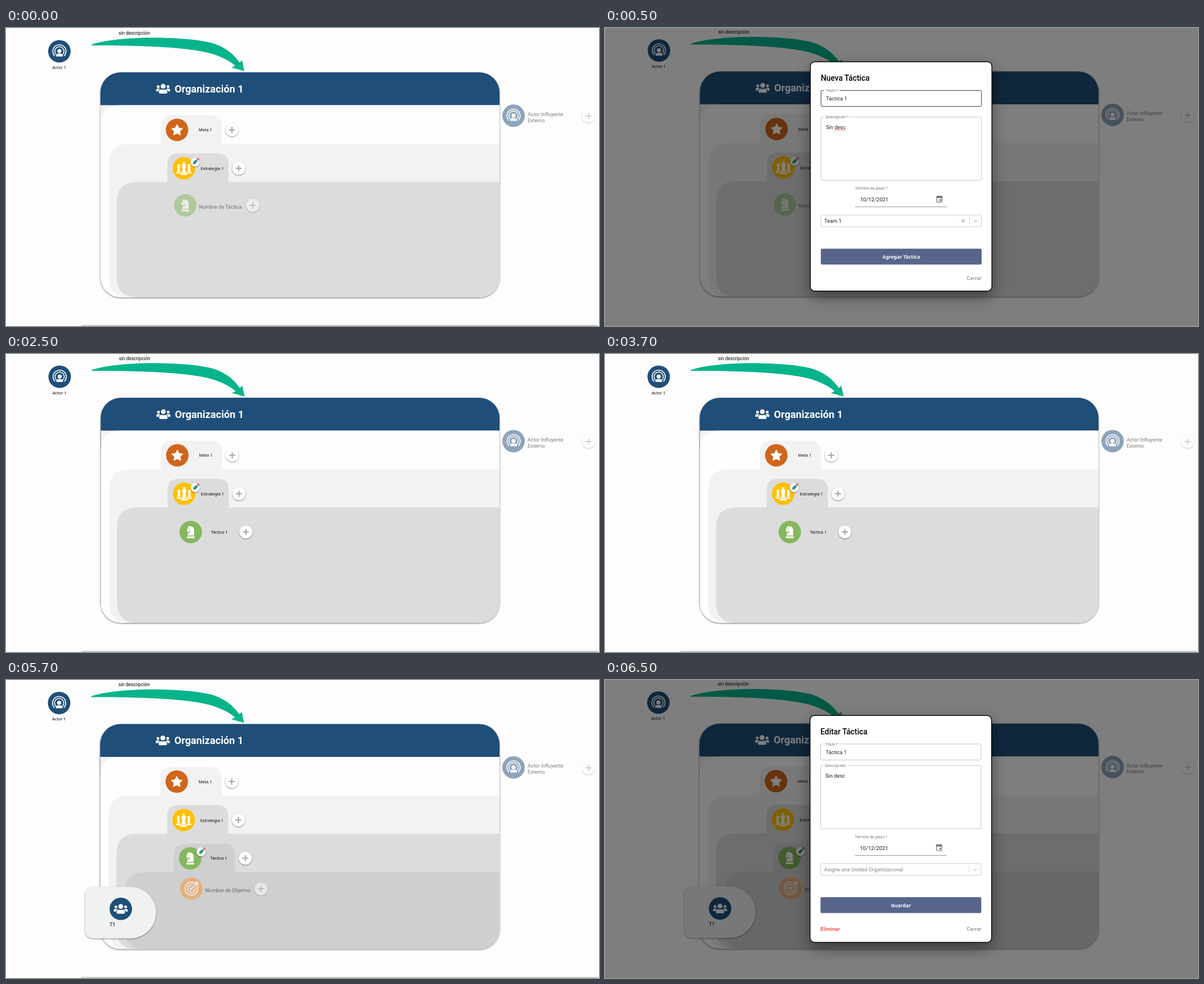
Write an HTML page that moves like this. It is 1055x531 px and loops after 8 s.

```html
<!DOCTYPE html>
<html lang="es">
<head>
<meta charset="utf-8">
<title>Organización</title>
<style>
html, body { margin: 0; width: 100%; height: 100%; overflow: hidden; background: #fdfdfd; }
svg { display: block; width: 1055px; height: 531px; }
text { font: 9.1px Roboto, sans-serif; fill: #000; }
.label { font: 500 7.4px "Noto Sans", sans-serif; }
.field { letter-spacing: .085px; fill: #1c1c1c; }
.small { font-size: 6.8px; letter-spacing: .06px; fill: #757575; }
.title { font: 500 13.8px Roboto, sans-serif; }
.main { font: 700 8.6px "Noto Sans", sans-serif; fill: #fff; text-anchor: middle; }
.link { font-weight: 500; letter-spacing: .2px; }
.soft { filter: drop-shadow(0 1px 1.3px rgba(0,0,0,.45)); }
.deep { filter: drop-shadow(0 10px 13px rgba(0,0,0,.42)); }
</style>
</head>
<body>
<svg id="stage" viewBox="0 0 1055 531"></svg>
<script>
const BLUE = '#1f4e79', ORANGE = '#d0661a', YELLOW = '#ffc000', GREEN = '#84b85e', AMBER = '#ff9131';
const RIGHT = 878;

const at = (x, y, body, attrs = '') => `<g transform="translate(${x} ${y})" ${attrs}>${body}</g>`;
const text = (x, y, s, cls = '', attrs = '') => `<text x="${x}" y="${y}" class="${cls}" ${attrs}>${s}</text>`;
const line = (d, color, w, attrs = '') => `<path d="${d}" fill="none" stroke="${color}" stroke-width="${w}" ${attrs}/>`;
const fill = (d, color) => `<path d="${d}" fill="${color}"/>`;
const dot = (x, y, r, color = '#fff') => `<circle cx="${x}" cy="${y}" r="${r}" fill="${color}"/>`;
const box = (x, y, w, h, r, attrs) => `<rect x="${x}" y="${y}" width="${w}" height="${h}" rx="${r}" ${attrs}/>`;
const badge = (x, y, color, icon) => at(x, y, dot(0, 0, 20, color) + icon);

const arc = (r, deg) => {
  const a = deg * Math.PI / 180, x = r * Math.cos(a), y = r * Math.sin(a);
  return line(`M${-x} ${y}A${r} ${r} 0 1 1 ${x} ${y}`, '#fff', 1.6, 'stroke-linecap="round"');
};

const star = () => {
  const pts = Array.from({ length: 10 }, (_, i) => {
    const r = i % 2 ? 5 : 10, a = i * Math.PI / 5;
    return `${r * Math.sin(a)},${.8 - r * Math.cos(a)}`;
  });
  return `<polygon points="${pts.join(' ')}" fill="#fff" stroke="#fff" stroke-width="1.4" stroke-linejoin="round"/>`;
};

const actorIcon = arc(11.8, 42) + arc(8.2, 38) + dot(0, -.4, 3.7) +
  fill('M-6 9.2V8Q-6 4.3 -2.4 4.3H2.4Q6 4.3 6 8V9.2Z', '#fff');

const side = dot(-8.7, -3.6, 2.5) + fill('M-12.4 4.2V1.8Q-12.4 .1 -10 .1H-7.2Q-6.2 .1 -5.5 .8Q-7.9 2.2 -8.5 4.9H-11.6Q-12.4 4.9 -12.4 4.2Z', '#fff');
const teamIcon = side + `<g transform="scale(-1 1)">${side}</g>` + dot(0, -4.3, 4.3) +
  fill('M-7.4 7V5.8Q-7.4 1.4 -3 1.4Q0 2.6 3 1.4Q7.4 1.4 7.4 5.8V7Q7.4 8.7 5.7 8.7H-5.7Q-7.4 8.7 -7.4 7Z', '#fff');

const pawn = x => at(x, 0, dot(0, -5.2, 2.3) +
  fill('M-2.6 -3H2.6V-1.6H1.6Q1.7 3 3 5.6H-3Q-1.7 3 -1.6 -1.6H-2.6ZM-4 6.4H4V9H-4Z', '#fff'));
const chessIcon = pawn(-9.3) + pawn(9.3) +
  fill('M-.9 -12H.9V-10.5H2.3V-8.8H.9V-7.3H4.6L2.8 -2.6H3.6V-.8H2.5Q2.7 5 4.2 8H-4.2Q-2.7 5 -2.5 -.8H-3.6V-2.6H-2.8L-4.6 -7.3H-.9V-8.8H-2.3V-10.5H-.9ZM-5.7 8.8H5.7V12H-5.7Z', '#fff');

const knightIcon = fill('M-4.6 -10.2H0Q6 -9.6 6 -2.5V6.2H-5.6V4.8Q-5.2 2.6 -2.7 1.2Q-.4 0 -.4 -2.3L-2.7 -1.4L-3.8 .5L-6.5 -.8V-5.5L-5 -7.4ZM-6.8 7.8H7V11H-6.8Z', '#fff') +
  dot(-2.6, -5.4, .9, GREEN);

const goalIcon = [11.4, 6.8].map(r => `<circle r="${r}" fill="none" stroke="#fff" stroke-width="2.1"/>`).join('') + dot(0, 0, 3) +
  line('M0 0L10 -10', AMBER, 4.5) + line('M0 0L9 -9', '#fff', 1.7) + fill('M6 -10L10.5 -14L11 -11L14 -10.5L10 -6H6Z', '#fff');

const plus = (x, y) => at(x, y, `<g class="soft">${dot(0, 0, 11.6)}</g>` + line('M-5.4 0H5.4M0 -5.4V5.4', '#a3a3a3', 2));

const pencil = (x, y) => at(x, y, `<g class="soft">${dot(0, 0, 8)}</g><g transform="rotate(-45)">` +
  fill('M-6.5 0L-3.2 -2.3V2.3Z', '#ecc9a0') + box(-3.4, -2.3, 8, 4.6, 0, 'fill="#239b8c"') +
  box(4.6, -2.3, 1.8, 4.6, 0, 'fill="#ccd"') + box(6.4, -2.3, 3, 4.6, 1, 'fill="#d9655d"') +
  line('M-3.2 0H4.6', '#157267', .7) + '</g>');

// A layer: rounded on its left side, with a tab standing on its top edge.
const layer = (x, y, tab, color) =>
  fill(`M${RIGHT} ${y}H${x + 36}Q${x} ${y} ${x} ${y + 36}V444Q${x} 480 ${x + 36} 480H${RIGHT}Z`, color) +
  (tab ? fill(`M${tab} ${y + 1}V${y - 31}q0 -20 20 -20h69q20 0 20 20V${y + 1}Z`, color) : '');

const arrow = fill('M152 29.6C180 20 230 17 270 17.3C310 18 350 21 372 28.5C393 36 406 48 415.5 61.5L420 57.5L424 76.8L401.5 70.5L408 67C391 53 368 45 345 41C290 32 210 31 152 31Z', '#06b48b');

function board({ dx, dy, stage }, id) {
  const w = RIGHT - 168 - dx;
  const third = stage === 'open';
  const frame = box(168, 79, w, 401, 36, `fill="${BLUE}"`);
  let s = `<clipPath id="${id}">${frame}</clipPath>`;
  s += badge(95, 41.5, BLUE, actorIcon) + text(94.8, 72.7, 'Actor 1', 'label', 'text-anchor="middle"');
  s += text(200.5, 11.5, 'sin descripción', '', 'style="font-size:8.25px"') + arrow;
  s += `<g style="filter:drop-shadow(0 1px 1.8px rgba(0,0,0,.55))">${frame}</g><g clip-path="url(#${id})">`;
  s += box(168, 137.5, w, 343, 0, 'fill="#f3f3f3"') + layer(168, 137.5, 0, '#fefefe');
  s += layer(183, 206.5, 275, '#f2f2f2') + layer(197, 274.5, 287, '#dcdcdc');
  if (third) s += layer(211, 343.3, 299, '#cfcfcf');
  s += '</g>' + at(279.5, 108, teamIcon);
  s += text(300, 114.7, 'Organización 1', '', 'style="font-size:18.15px;font-weight:700;fill:#fff"');
  s += badge(304.3, 181.5, ORANGE, star()) + text(343, 184.3, 'Meta 1', 'label') + plus(402, 181.5);
  s += badge(316.5, 250, YELLOW, chessIcon) + text(346.3, 253, 'Estrategia 1', 'label') + plus(414, 250);
  if (stage === 'empty') {
    s += at(0, 0, badge(319, 316, GREEN, knightIcon) + text(343.2, 321.6, 'Nombre de Táctica') + plus(439, 316), 'opacity=".5"');
  } else {
    s += badge(328.2, 318.2, GREEN, knightIcon) + text(364.2, 320.9, 'Táctica 1', 'label') + plus(426.2, 318);
  }
  s += third ? pencil(347.6, 306.8) : pencil(336.2, 239.2);
  if (third) {
    s += at(0, 0, badge(330.4, 372.3, AMBER, goalIcon) + text(355.3, 378, 'Nombre de Objetivo') + plus(454.3, 372.5), 'opacity=".5"');
    s += `<g class="soft">${fill('M157 369H221.5A46 46 0 0 1 221.5 461H157Q141 461 141 445V385Q141 369 157 369Z', '#f0f2f2')}</g>`;
    s += badge(204.7, 408.3, BLUE, teamIcon) + text(184.7, 439.2, 'T1');
  }
  const outside = badge(903, 156.3, BLUE, actorIcon) + text(928, 156.8, 'Actor Influyente') +
    text(928, 167.6, 'Externo') + plus(1036.5, 157);
  return at(dx, dy, s) + at(0, dy, outside, 'opacity=".5"');
}

const field = (x, y, h, label, gap, color = '#c4c4c4') =>
  box(x, y, 285.5, h, 2.5, `fill="none" stroke="${color}" stroke-width="1"`) +
  box(x + 5, y - 1, gap, 2, 0, 'fill="#fff"') + text(x + 8, y + 2.5, label, 'small');

const calendar = (x, y) => at(x, y, box(-4.6, -4.5, 9.2, 10, 1, 'fill="none" stroke="#6b6b6b" stroke-width="1.2"') +
  fill('M-5.2 -5H5.2V-2H-5.2ZM-3.5 -6.3H-2.3V-4H-3.5ZM2.3 -6.3H3.5V-4H2.3ZM.2 .3H3V3.2H.2Z', '#6b6b6b'));

// Date, selector and main button; y is the date underline.
function lower(x, y, value, chosen, action) {
  return text(x + 61, y - 31, 'Término de plazo *', 'small') + text(x + 70, y - 10, '10/12/2021', 'field', 'style="font-size:9.3px"') +
    calendar(x + 211, y - 14) + line(`M${x + 61} ${y}h163.5`, '#8a8a8a', .9) +
    box(x, y + 14.5, 285.5, 21, 2.3, 'fill="#fff" stroke="#ccc" stroke-width="1"') +
    text(x + 6.3, y + 28.4, value, 'field', chosen ? '' : 'style="fill:#808080"') +
    line(`M${x + 264.5} ${y + 19.5}v11.5`, '#ccc', .9) +
    line(`M${x + 272} ${y + 23.8}l3 3l3 -3`, '#bbb', 1.2) +
    (chosen ? line(`M${x + 251} ${y + 22.5}l5 5m0 -5l-5 5`, '#a8a8a8', 1.2) : '') +
    box(x, y + 74.5, 286, 28.3, 2, 'fill="#57658b"') + text(x + 143, y + 92, action, 'main');
}

const sheet = (x, y, h) => '<rect width="1055" height="531" opacity=".5"/>' +
  box(x, y, 323, h, 8, 'class="deep" fill="#fff" stroke="#0c0c0c" stroke-width="1.5"');
const close = y => text(670, y, 'Cerrar', 'link', 'text-anchor="end" style="fill:#8c8c8c"');

const wave = 'M408 181.5' + 'q1 -1.6 2 0t2 0'.repeat(5);
const createForm = () => sheet(365.3, 60.2, 408.6) + text(384, 94.3, 'Nueva Táctica', 'title') +
  field(384.3, 111.3, 28.5, 'Título *', 28, '#333') + text(393.2, 129.2, 'Táctica 1', 'field') +
  field(384.3, 158.8, 112.5, 'Descripción *', 47) + text(393, 180, 'Sin desc', 'field') + line(wave, '#e33', .8) +
  lower(384, 318.7, 'Team 1', true, 'Agregar Táctica') + close(448.8);

const editForm = () => sheet(364.8, 63.2, 404.3) + text(383.2, 97, 'Editar Táctica', 'title') +
  field(383.6, 114, 28.5, 'Título *', 28) + text(392.5, 132, 'Táctica 1', 'field') +
  field(383.6, 152.4, 112.7, 'Descripción', 43) + text(392.3, 173.7, 'Sin desc', 'field') +
  lower(383.4, 312.5, 'Asigne una Unidad Organizacional', false, 'Guardar') +
  text(383.3, 447.2, 'Eliminar', 'link', 'style="fill:#f5362f"') + close(447.2);

const LOOP = 8000;
const scenes = [
  { start: 0, dx: 0, dy: 0, stage: 'empty' },
  { start: 500, dx: 1, dy: -1.5, stage: 'empty', form: createForm },
  { start: 2500, dx: .5, dy: -1, stage: 'added' },
  { start: 4500, dx: -.5, dy: -.5, stage: 'open' },
  { start: 6500, dx: 0, dy: -1.2, stage: 'open', form: editForm },
];

const svg = document.getElementById('stage');
svg.innerHTML = scenes.map((s, i) => '<g><rect width="1055" height="531" fill="#fdfdfd"/>' + board(s, 'clip' + i) +
  (s.form ? s.form() : box(134, 529, 919, 2, 0, 'fill="#c9c9c9"')) + '</g>').join('');
const views = [...svg.children];

const begin = performance.now();
function tick() {
  const t = (performance.now() - begin) % LOOP;
  const now = scenes.filter(s => s.start <= t).length - 1;
  views.forEach((v, i) => { v.style.display = i === now ? '' : 'none'; });
  requestAnimationFrame(tick);
}
tick();
</script>
</body>
</html>
```
